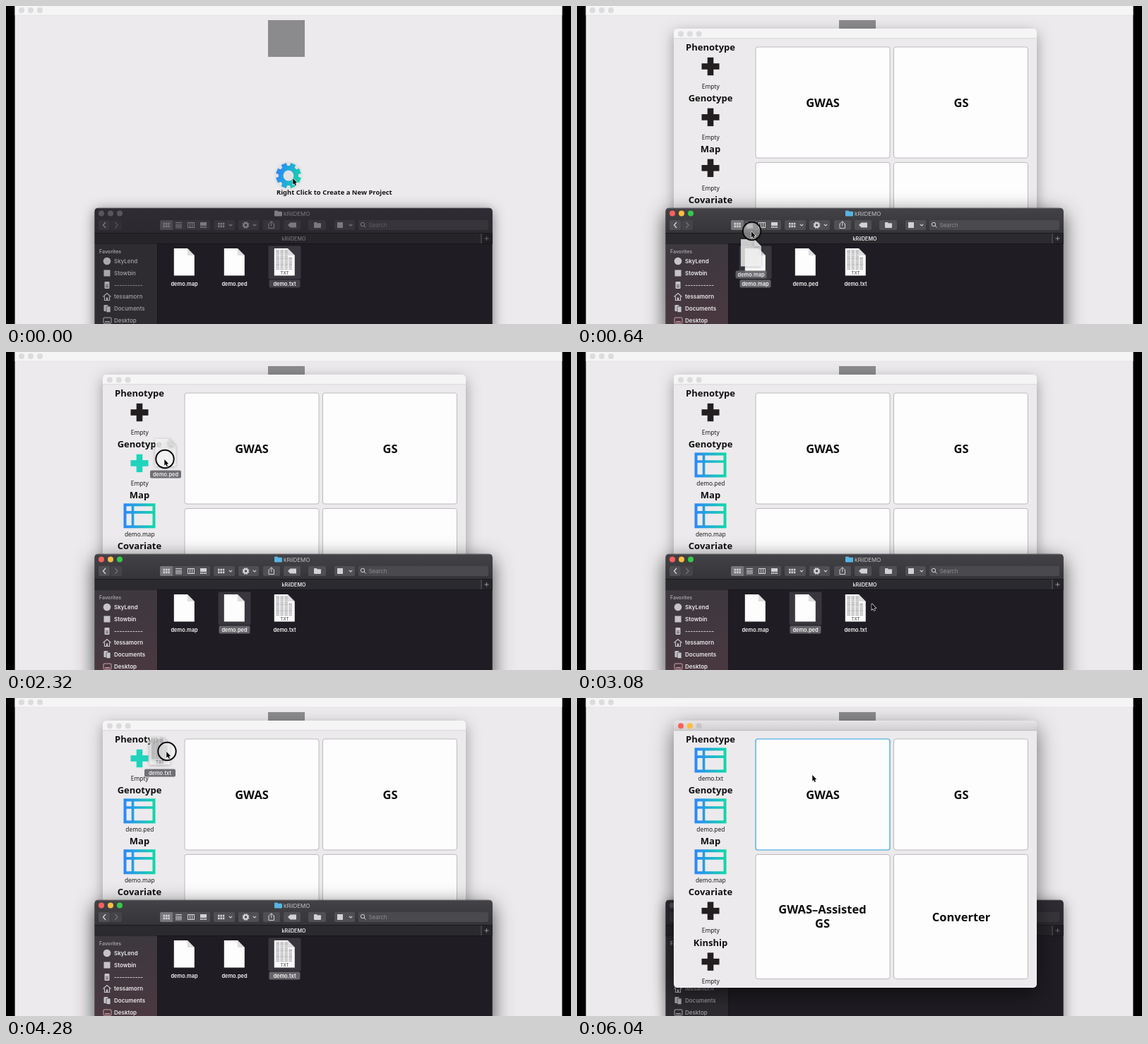
Write an HTML page with a canvas that moves like this. It is 800 px wide and 450 px high and loops after 6.08 s.

```html
<!DOCTYPE html>
<html lang="en">
<head>
<meta charset="utf-8">
<title>Project demo</title>
<style>
html, body { margin: 0; width: 100%; height: 100%; overflow: hidden; background: #000; }
canvas { display: block; width: 800px; height: 450px; }
</style>
</head>
<body>
<canvas id="stage" width="800" height="450"></canvas>
<script>
const c = document.getElementById('stage').getContext('2d');
const LOOP = 6080, STEP = 40;
const JAVA = '"Noto Sans", sans-serif', UI = 'Inter, sans-serif';
const GREY = ['#dcdbdd', '#dcdbdd', '#dcdbdd'];
const LIGHTS = ['#fc5f5b', '#fdbd40', '#35c94b'];

// Moments at which the state changes
const OPEN = 120, FINDER_BACK = 440, FRONT = 5640, FOCUS = 5720;
const files = [
  { name: 'demo.map', x: 252.5, slot: 2, grab: 600, hover: 960, drop: 1320, dx: -1, dy: 61 },
  { name: 'demo.ped', x: 323.5, slot: 1, grab: 1900, hover: 2240, drop: 2600, dx: 1, dy: 21 },
  { name: 'demo.txt', x: 394.5, slot: 0, grab: 3440, hover: 4160, drop: 4520, dx: -10, dy: 30 }
];
// Pointer path: time, x, y
const path = [
  [0, 407, 244], [360, 407, 244], [560, 253, 332], [600, 253, 332], [720, 232, 282],
  [1120, 210, 240], [1400, 207, 238], [1840, 322, 372], [1900, 322, 372],
  [2320, 225, 152], [2680, 222, 150], [3080, 418, 356], [3200, 428, 362],
  [3360, 404, 363], [3480, 404, 363], [4280, 228, 76], [4600, 226, 76],
  [5120, 250, 84], [5440, 334, 109], [LOOP, 334, 109]
];

function pointer(t) {
  let i = 1;
  while (i < path.length - 1 && path[i][0] < t) i++;
  const [t0, x0, y0] = path[i - 1], [t1, x1, y1] = path[i];
  const u = Math.min(1, Math.max(0, (t - t0) / (t1 - t0)));
  const e = u * u * (3 - 2 * u);
  return { x: x0 + (x1 - x0) * e, y: y0 + (y1 - y0) * e };
}

function box(x, y, w, h, fill, r = 0, stroke, lw = 1) {
  c.beginPath();
  c.roundRect(x, y, w, h, r);
  if (fill) { c.fillStyle = fill; c.fill(); }
  if (stroke) { c.strokeStyle = stroke; c.lineWidth = lw; c.stroke(); }
}

function dot(x, y, r, fill) {
  c.beginPath();
  c.arc(x, y, r, 0, Math.PI * 2);
  c.fillStyle = fill;
  c.fill();
}

function line(points, color, lw = 1) {
  c.beginPath();
  points.forEach(([x, y], i) => i ? c.lineTo(x, y) : c.moveTo(x, y));
  c.strokeStyle = color;
  c.lineWidth = lw;
  c.stroke();
}

function shape(points, fill) {
  c.beginPath();
  points.forEach(([x, y]) => c.lineTo(x, y));
  c.closePath();
  c.fillStyle = fill;
  c.fill();
}

function text(s, x, y, font, color, align = 'center') {
  c.font = font;
  c.fillStyle = color;
  c.textAlign = align;
  c.textBaseline = 'alphabetic';
  c.fillText(s, x, y);
}

function shadowed(blur, dy, alpha, draw) {
  c.save();
  c.shadowColor = `rgba(0,0,0,${alpha})`;
  c.shadowBlur = blur;
  c.shadowOffsetY = dy;
  draw();
  c.restore();
}

function blend(x0, y0, x1, y1, from, to) {
  const g = c.createLinearGradient(x0, y0, x1, y1);
  g.addColorStop(0, from);
  g.addColorStop(1, to);
  return g;
}

function bluish(x0, y0, x1, y1) {
  return blend(x0, y0, x1, y1, '#2d86fb', '#12d9a8');
}

function lights(x, y, gap, colors) {
  colors.forEach((col, i) => dot(x + i * gap, y, 4, col));
}

function gear(x, y, r, fill, hole) {
  c.beginPath();
  for (let i = 0; i < 8; i++) {
    const a = i * Math.PI / 4 + Math.PI / 8;
    for (const [da, k] of [[-.27, .78], [-.21, 1], [.21, 1], [.27, .78]])
      c.lineTo(x + Math.cos(a + da) * r * k, y + Math.sin(a + da) * r * k);
  }
  c.closePath();
  c.moveTo(x + hole, y);
  c.arc(x, y, hole, 0, Math.PI * 2, true);
  c.fillStyle = fill;
  c.fill('evenodd');
}

function mainWindow() {
  box(0, 0, 800, 450, '#000');
  box(12.6, 0, 774.8, 450, '#eceaec');
  box(12.6, 0, 774.8, 13, '#f6f5f6');
  box(13, 12.7, 774, .6, '#dad8da');
  lights(22, 6, 13, GREY);
  box(371, 20, 52, 52, '#8b8b8d');
  dot(400, 240, 20.5, '#e2e2e5');
  gear(400, 240, 18.2, bluish(384, 234, 418, 246), 7.4);
  text('Right Click to Create a New Project', 383, 267, `bold 9.45px ${JAVA}`, '#151515', 'left');
}

function plus(x, y, color) {
  box(x - 4.3, y - 12.7, 8.6, 25.4, color);
  box(x - 12.5, y - 4.3, 25, 8.6, color);
}

function table(x, y) {
  const g = bluish(x, 0, x + 45, 0);
  c.strokeStyle = g;
  c.lineWidth = 4;
  c.strokeRect(x + 2, y + 2, 41, 31);
  line([[x + 13, y + 2], [x + 13, y + 33]], g, 3.6);
  line([[x + 2, y + 12.6], [x + 43, y + 12.6]], g, 3.6);
}

function projectWindow(t) {
  const front = t >= FRONT, top = front || t < FINDER_BACK;
  shadowed(top ? 30 : 20, top ? 10 : 6, top ? .55 : .35, () => box(137, 32, 514, 378, '#eceaec', 5));
  box(137, 32, 514, 14, front ? blend(0, 32, 0, 46, '#e6e4e6', '#d0ced0') : '#f6f5f6', [5, 5, 0, 0]);
  box(137, 45.5, 514, .8, front ? '#b4b2b4' : '#d0ced0');
  lights(147, 39.5, 12.8, front ? [LIGHTS[0], LIGHTS[1], '#c6c4c6'] : GREY);

  ['Phenotype', 'Genotype', 'Map', 'Covariate', 'Kinship'].forEach((name, i) => {
    const y = i * 71.9;
    const file = files.find(f => f.slot === i);
    const filled = file && t >= file.drop;
    text(name, 189, 63 + y, `bold 13px ${JAVA}`, '#111');
    if (filled) table(166.5, 70.5 + y);
    else plus(189, 85.5 + y, file && t >= file.hover ? '#1fd3bd' : '#231f20');
    text(filled ? file.name : 'Empty', 189.3, 116.7 + y, `8.4px ${JAVA}`, '#1c1c1c');
  });

  [[253, 58, 190, 157], [448.5, 58, 190, 157], [253, 221.5, 190, 176], [448.5, 221.5, 190, 176]]
    .forEach(([x, y, w, h], i) => {
      const focus = i === 0 && t >= FOCUS;
      box(x, y, w, h, '#fefdfe', 3, focus ? '#6fbbe4' : '#bcbabc', focus ? 1.7 : 1);
    });
  const big = `bold 16.5px ${JAVA}`;
  text('GWAS', 348, 142.5, big, '#0c0c0c');
  text('GS', 544, 142.5, big, '#0c0c0c');
  text('GWAS–Assisted', 347.5, 305, big, '#0c0c0c');
  text('GS', 347.5, 325, big, '#0c0c0c');
  text('Converter', 544, 315.5, big, '#0c0c0c');
}

// Document sheet centred on x, with its top at y
function sheet(x, y, txt) {
  const l = x - 14.7, r = x + 14.3, b = y + 38.5, k = 10;
  shape([[l, y], [r - k, y], [r, y + k], [r, b], [l, b]], '#fdfdfd');
  if (txt) {
    for (let row = 0; row < 16; row++)
      for (let col = 0; col < 4; col++)
        if (row > 5 || col < 3) box(l + 2.5 + col * 6, y + 2 + row * 1.8, 4.8, 1.1, '#aeaeb0');
    text('TXT', x, b - 2, `500 6px ${UI}`, '#555');
  }
  shape([[r - k, y], [r - k, y + k], [r, y + k]], '#dededf');
}

function fileLabel(name, x, y, fill) {
  if (fill) box(x - 22, y - 5.5, 44, 11, fill, 2);
  text(name, x, y + 2.6, `600 7.4px ${UI}`, '#f4f4f5');
}

function folder(x, y, w, h, color) {
  box(x, y, w * .45, h * .5, color, 1);
  box(x, y + h * .15, w, h * .85, color, 1);
}

function chevron(x, y, w, h, color) {
  line([[x - w, y - h], [x, y], [x + w, y - h]], color, 1.1);
}

function toolbar(on) {
  const btn = on ? '#504f53' : '#37353a', ink = on ? '#d2d1d4' : '#7b797e';
  const y = 303, h = 14;
  box(131, y, 16, h, btn, 2);
  box(148, y, 16, h, on ? '#454448' : '#332f36', 2);
  line([[141, 306], [137.5, 310], [141, 314]], ink, 1.3);
  line([[154.5, 306], [158, 310], [154.5, 314]], on ? '#717074' : '#55535a', 1.3);
  [[218, 71], [294, 30], [329, 29], [364, 24], [393, 24], [428, 25], [465, 29]]
    .forEach(([x, w]) => box(x, y, w, h, btn, 2));
  box(218, y, 18, h, on ? '#77767a' : '#4c4a50', [2, 0, 0, 2]);

  for (let i = 0; i < 6; i++) {
    const dx = i % 3 * 3.4, dy = Math.floor(i / 3) * 3.8;
    box(222.5 + dx, 306.7 + dy, 2.5, 2.7, ink);
    box(300 + dx, 306.7 + dy, 2.5, 2.7, ink);
  }
  for (let i = 0; i < 4; i++) box(240, 306 + i * 2.4, 9, 1.1, ink);
  c.strokeStyle = ink;
  c.lineWidth = 1;
  c.strokeRect(257.5, 306.5, 9, 7);
  line([[260.5, 306.5], [260.5, 313.5]], ink);
  line([[263.5, 306.5], [263.5, 313.5]], ink);
  box(275, 306, 9, 5, ink);
  for (let i = 0; i < 4; i++) box(275 + i * 2.4, 312, 1.7, 2, ink);

  gear(339.5, 310, 5, ink, 1.7);
  [318, 352, 488].forEach(x => chevron(x, 311, 2.2, 2.2, ink));
  line([[373.5, 308], [372, 308], [372, 314.5], [379.5, 314.5], [379.5, 308], [378, 308]], ink);
  line([[375.8, 311.5], [375.8, 305]], ink);
  line([[373.5, 307], [375.8, 304.7], [378, 307]], ink);
  shape([[399, 310], [402.5, 306.5], [411, 306.5], [411, 313.5], [402.5, 313.5]], ink);
  folder(436, 306, 10, 8, ink);
  box(469, 306, 8, 8, ink);

  const hint = on ? '#8e8d91' : '#5e5c62';
  box(499, y, 184, h, on ? '#4a494d' : '#37353a', 2);
  c.beginPath();
  c.arc(505, 309, 2.7, 0, Math.PI * 2);
  c.strokeStyle = ink;
  c.lineWidth = 1;
  c.stroke();
  line([[507, 311], [509.5, 313.5]], ink);
  text('Search', 513.5, 312.8, `7.8px ${UI}`, hint, 'left');
}

function sidebar(on) {
  box(126, 336.5, 88.5, 114, on ? blend(126, 336, 150, 450, '#3b383e', '#493840') : '#2e2b31');
  box(214, 336.5, 1, 114, '#17161a');
  const ink = on ? '#e9e8ea' : '#a5a3a8', icon = on ? '#c6c4c9' : '#aaa8ad';
  const desk = on ? '#d5a0aa' : icon;
  text('Favorites', 132, 349.5, `600 7px ${UI}`, '#a3a0a6', 'left');
  ['SkyLend', 'Stowbin', '-----------', 'tessamorn', 'Documents', 'Desktop'].forEach((s, i) => {
    text(s, 153, 364.2 + i * 16.75, `${on ? 600 : 500} 8px ${UI}`, ink, 'left');
  });
  dot(143, 361, 5.3, icon);
  box(138.5, 373.5, 9, 9, icon);
  box(139.5, 390, 7, 10, icon, 1);
  line([[141, 395], [145, 395]], '#444147');
  line([[141, 397.5], [145, 397.5]], '#444147');
  line([[137.5, 411.5], [143, 406.5], [148.5, 411.5]], icon, 1.2);
  line([[139.5, 411], [139.5, 416.5], [146.5, 416.5], [146.5, 411]], icon, 1.2);
  box(141.8, 412.5, 2.4, 4, icon);
  box(138.5, 423, 6, 9, icon, 1);
  box(142, 425, 6, 8.5, icon, 1, '#3b383e', .7);
  box(138, 441, 11, 8, null, 1, desk);
  box(140, 446, 7, 1.3, desk);
}

function finder(t, on) {
  const x = 125.5, w = 563.2;
  shadowed(on ? 28 : 18, on ? 8 : 3, on ? .7 : .5, () => box(x, 285.7, w, 180, '#1f1d23', 5));
  c.save();
  c.beginPath();
  c.roundRect(x, 285.7, w, 180, 5);
  c.clip();
  box(x, 286, w, 35, on ? blend(0, 286, 0, 321, '#434246', '#353438')
    : blend(0, 286, 0, 321, '#2f2c33', '#2b292f'));
  box(x, 286, w, .8, on ? '#626066' : '#4a484e');
  box(x, 321, w, 15.5, on ? '#2b2a2e' : '#262429');
  box(x, 321, w, .7, '#151417');
  box(x, 336, w, .8, '#131216');
  const mark = on ? '#99979c' : '#69676c';
  box(672.5, 322, 1, 14, '#5a585d');
  box(674, 322, 15, 14, on ? '#252428' : '#1f1d22');
  box(677.5, 328.6, 6, .9, mark);
  box(680, 326, .9, 6, mark);
  lights(135, 293.5, 13, on ? LIGHTS : ['#58565b', '#58565b', '#58565b']);
  folder(380, 289.5, 11, 8, on ? '#57b4e4' : '#7e7c81');
  text('kRilDEMO', 393, 296.7, `8px ${UI}`, on ? '#c4c3c6' : '#7e7c81', 'left');
  text('kRilDEMO', 407.5, 331.7, `600 7.2px ${UI}`, on ? '#e4e3e6' : '#69676c');
  toolbar(on);
  sidebar(on);

  let picked = 2;
  if (t >= FINDER_BACK) picked = files.reduce((n, f, i) => t >= f.grab - 40 ? i : n, -1);
  files.forEach((f, i) => {
    if (i === picked) box(f.x - 23, 339.5, 46, 47, '#39373d', 2);
    sheet(f.x, 343, i === 2);
    fileLabel(f.name, f.x, 393, i === picked && (on ? '#66656a' : '#454349'));
  });
  c.restore();
}

function drag(t, p) {
  const f = files.find(f => t >= f.grab && t < f.drop);
  if (!f) return;
  const x = p.x + f.dx, y = p.y + f.dy;
  c.save();
  c.globalAlpha = .78;
  shadowed(4, 1, .35, () => sheet(x, y - 50, f.slot === 0));
  c.globalAlpha = .92;
  fileLabel(f.name, x, y, '#66656a');
  c.restore();
}

function cursor(t, p) {
  const down = files.some(f => t >= f.grab && t < f.drop) || (t >= FRONT - 40 && t < FRONT + 80);
  if (down) {
    c.beginPath();
    c.arc(p.x, p.y - .5, 12.7, 0, Math.PI * 2);
    c.fillStyle = 'rgba(255,255,255,.4)';
    c.fill();
    c.strokeStyle = '#0c0c0c';
    c.lineWidth = 2;
    c.stroke();
  }
  const arrow = [[0, 0], [0, 8.6], [1.9, 7], [3.3, 10], [4.7, 9.4], [3.4, 6.4], [5.9, 6.2]]
    .map(([x, y]) => [p.x - .7 + x, p.y + y]);
  line([...arrow, arrow[0]], '#fff', 1.2);
  shape(arrow, '#000');
}

function render(t) {
  const p = pointer(t);
  mainWindow();
  if (t < STEP || t >= FRONT) finder(t, false);
  if (t >= OPEN) {
    const u = Math.min(1, (t - OPEN + STEP) / 160), s = .9 + .1 * u;
    c.save();
    c.globalAlpha = u;
    c.translate(394, 221);
    c.scale(s, s);
    c.translate(-394, -221);
    projectWindow(t);
    c.restore();
  }
  if (t >= FINDER_BACK && t < FRONT) finder(t, true);
  drag(t, p);
  cursor(t, p);
}

const start = performance.now();
function tick() {
  const t = (performance.now() - start) % LOOP;
  render(Math.floor(t / STEP) * STEP);
  requestAnimationFrame(tick);
}
tick();
</script>
</body>
</html>
```
